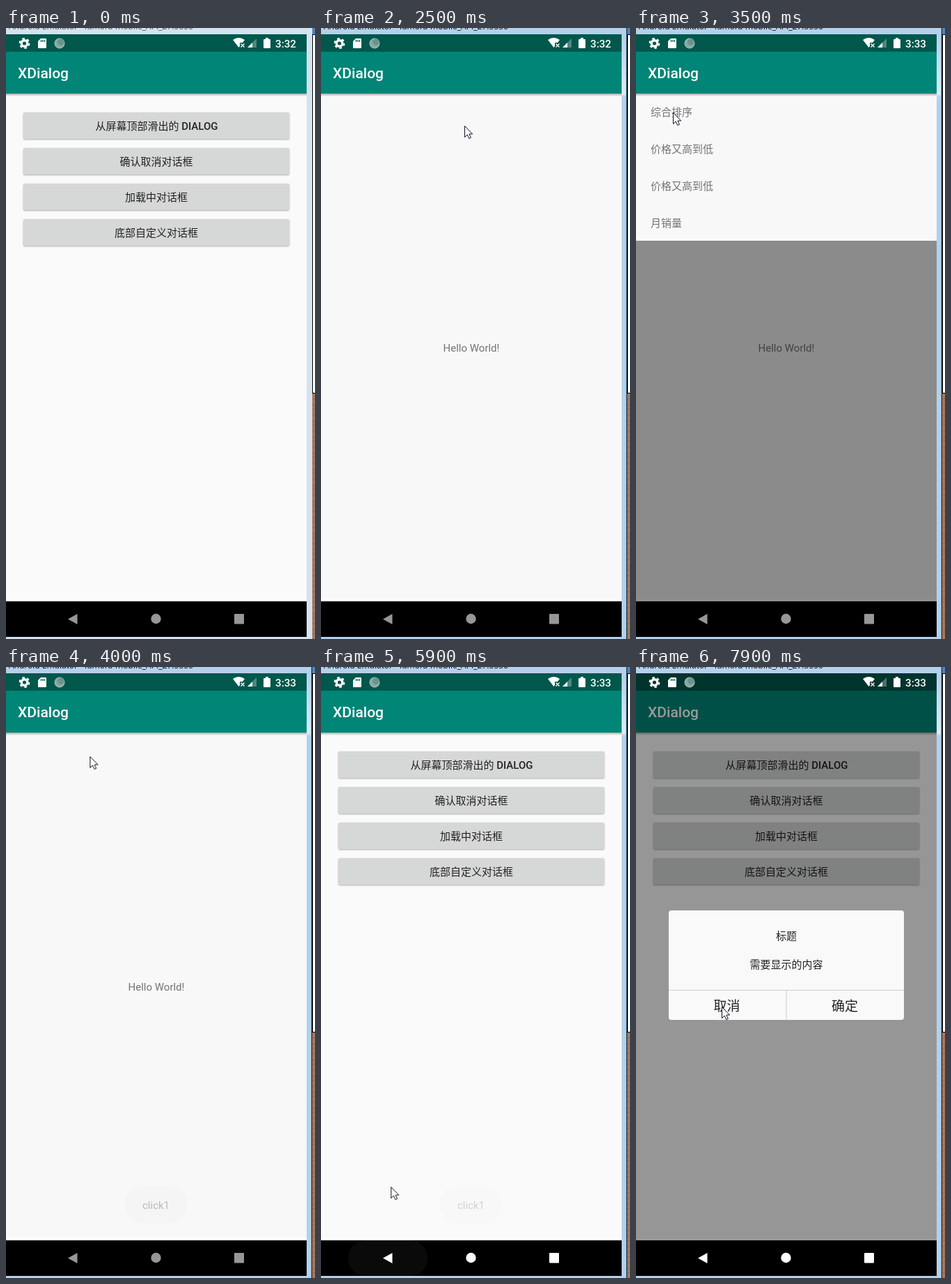
Animation, 444 px wide and 876 px high, one loop 8000 ms. Source, as an HTML page:

```html
<!DOCTYPE html>
<html lang="zh-CN">
<head>
<meta charset="utf-8">
<title>XDialog</title>
<style>
html, body { margin: 0; width: 100%; height: 100%; overflow: hidden; }
body > svg { display: block; width: 444px; height: 876px; }
text { font: 15px Roboto, "Noto Sans CJK SC", sans-serif; fill: #222; }
.mid { text-anchor: middle; }
.medium { font-weight: 500; }
.soft { fill: #747474; }
.big { font-size: 19px; }
.caption { font: 12px "Open Sans", sans-serif; }
.heading { font-size: 21px; font-weight: 500; fill: #fff; }
.clock { font-size: 15.2px; font-weight: 500; fill: #fff; }
.key { fill: #d6d7d7; filter: drop-shadow(0 1px 1px rgba(0, 0, 0, .32)); }

/* One loop is 8 s, so 1% is 80 ms. */
.anim { animation: 8s linear infinite; }
.focus { animation-name: focus; }
.cursor { animation-name: cursor; }
.page { animation-name: page; }
.press1 { animation-name: press1; }
.press2 { animation-name: press2; }
.early { animation-name: early; }
.late { animation-name: late; }
.shade { animation-name: shade; }
.menu { animation-name: menu; }
.toast { animation-name: toast; }
.nav { animation-name: nav; }
.back { animation-name: back; }
.dim { animation-name: dim; }
.dialog { animation-name: dialog; transform-origin: 216px 428px; }

@keyframes focus { 0%, 17.49% { opacity: 0; } 17.5%, 100% { opacity: 1; } }
@keyframes cursor {
  0%, 9.95% { transform: translate(450px, 300px); }
  10% { transform: translate(434px, 285px); animation-timing-function: ease-out; }
  17% { transform: translate(221px, 146px); }
  20%, 31.2% { transform: translate(215px, 140px); }
  31.25%, 38.75% { transform: translate(206px, 140px); animation-timing-function: ease-in-out; }
  43.75%, 45.5% { transform: translate(53px, 121px); animation-timing-function: ease-in-out; }
  53.75%, 57.5% { transform: translate(169px, 133px); animation-timing-function: ease-in-out; }
  63.75% { transform: translate(114px, 812px); animation-timing-function: ease-out; }
  68.75%, 69.5% { transform: translate(98px, 840px); animation-timing-function: ease-in; }
  73.75% { transform: translate(100px, 747px); animation-timing-function: ease-out; }
  80% { transform: translate(160px, 188px); animation-timing-function: ease-out; }
  82.5%, 90% { transform: translate(208px, 187px); animation-timing-function: ease-in-out; }
  98.75%, 100% { transform: translate(123px, 487px); }
}
@keyframes page {
  0%, 20.35% { opacity: 0; transform: translateY(69px); animation-timing-function: cubic-bezier(.22, 1, .36, 1); }
  25.5%, 69.25% { opacity: 1; transform: none; animation-timing-function: ease-in; }
  73%, 100% { opacity: 0; transform: translateY(69px); }
}
@keyframes press1 {
  0%, 17.9% { r: 0; opacity: 0; }
  18% { r: 20px; opacity: 1; }
  22.5% { r: 195px; opacity: 1; }
  25%, 100% { r: 195px; opacity: 0; }
}
@keyframes press2 {
  0%, 84% { r: 0; opacity: 0; }
  84.4% { r: 15px; opacity: 1; }
  87.5% { r: 133px; opacity: 1; }
  88.75%, 90.5% { r: 187px; opacity: 1; }
  92%, 100% { r: 187px; opacity: 0; }
}
@keyframes early { 0%, 33.74% { opacity: 1; } 33.75%, 100% { opacity: 0; } }
@keyframes late { 0%, 33.74% { opacity: 0; } 33.75%, 100% { opacity: 1; } }
@keyframes shade { 0%, 33.1% { opacity: 0; } 36.25%, 45.6% { opacity: .44; } 49.4%, 100% { opacity: 0; } }
@keyframes menu {
  0%, 33.1% { transform: translateY(-212px); }
  36.25%, 45.6% { transform: none; }
  49.4%, 100% { transform: translateY(-212px); }
}
@keyframes toast { 0%, 48.75% { opacity: 0; } 53%, 70.6% { opacity: 1; } 74.5%, 100% { opacity: 0; } }
@keyframes nav { 0%, 69.9% { fill: #979797; } 70%, 100% { fill: #fff; } }
@keyframes back { 0%, 69.5% { opacity: 0; } 70.5%, 74% { opacity: .04; } 79%, 100% { opacity: 0; } }
@keyframes dim { 0%, 84.4% { opacity: 0; } 88.75%, 100% { opacity: .4; } }
@keyframes dialog {
  0%, 84.4% { opacity: 0; transform: scale(.9); animation-timing-function: ease-out; }
  87.3%, 100% { opacity: 1; transform: none; }
}
</style>
</head>
<body>
<svg viewBox="0 0 444 876">
  <defs>
    <linearGradient id="fade" x2="0" y2="1">
      <stop stop-opacity=".32"/><stop offset="1" stop-opacity="0"/>
    </linearGradient>
    <linearGradient id="glass" x2="0" y2="1">
      <stop stop-color="#b5d0ea"/><stop offset=".95" stop-color="#dcebfa"/><stop offset="1" stop-color="#b5d0ea"/>
    </linearGradient>
    <pattern id="wood" width="6" height="23" patternUnits="userSpaceOnUse">
      <path fill="#a87860" d="M0 0h6v23H0z"/>
      <path stroke="#946650" d="M0 4l6-2M0 11l6 1M0 19l6-2"/>
    </pattern>
    <g id="bars">
      <path fill="url(#fade)" d="M0 94h432v4H0z"/>
      <path fill="#00574b" d="M0 9h432v25H0z"/>
      <path fill="#008577" d="M0 34h432v60H0z"/>
      <path d="M0 822h432v51H0z"/>
      <text class="heading" x="17" y="72">XDialog</text>
    </g>
  </defs>

  <!-- desktop and window frame -->
  <path fill="#d5e2f0" d="M0 0h444v876H0z"/>
  <text class="caption" x="4" y="2" style="fill:#555">Android Emulator - lumora-mobile_API_27:5556</text>
  <g class="anim focus">
    <path fill="#b5d0ea" d="M0 0h440v876H0z"/>
    <path fill="url(#glass)" d="M432 9h7v90h-7z"/>
    <text class="caption" x="4" y="2" style="fill:#111">Android Emulator - lumora-mobile_API_27:5556</text>
    <path fill="#6fb4d8" d="M438 0h1v876h-1z"/>
    <path fill="#222" d="M439 0h1v876h-1z"/>
  </g>
  <path fill="#4f84c4" d="M440 0h4v9h-4z"/>
  <path d="M440 9h4v515h-4z"/>
  <path fill="#fff" d="M441 10h3v513h-3z"/>
  <path fill="url(#wood)" d="M440 524h4v352h-4z"/>

  <svg width="432" height="873">
    <!-- button list -->
    <path fill="#fafafa" d="M0 94h432v728H0z"/>
    <path fill="#fff" d="M0 818h432v4H0z"/>
    <use href="#bars"/>
    <g class="key">
      <rect x="25" y="121" width="382" height="38" rx="2"/>
      <rect x="25" y="172" width="382" height="38" rx="2"/>
      <rect x="25" y="223" width="382" height="38" rx="2"/>
      <rect x="25" y="274" width="382" height="38" rx="2"/>
    </g>
    <svg x="25" y="121" width="382" height="38"><circle class="anim press1" cx="192" cy="19" fill-opacity=".06"/></svg>
    <svg x="25" y="172" width="382" height="38"><circle class="anim press2" cx="187" cy="19" fill-opacity=".06"/></svg>
    <g class="mid">
      <text x="216.5" y="146">从屏幕顶部滑出的 <tspan class="medium">DIALOG</tspan></text>
      <text x="216" y="197">确认取消对话框</text>
      <text x="216" y="248">加载中对话框</text>
      <text x="216" y="299">底部自定义对话框</text>
    </g>

    <!-- second page -->
    <g class="anim page">
      <path fill="#f8f8f8" d="M0 94h432v728H0z"/>
      <path fill="#fff" d="M0 818h432v4H0z"/>
      <text class="mid soft" x="216" y="464">Hello World!</text>
      <path class="anim shade" d="M0 94h432v728H0z"/>
      <svg y="94" width="432" height="728">
        <g class="anim menu">
          <path fill="#f8f8f8" d="M0 0h432v211H0z"/>
          <text class="soft" x="21" y="32">综合排序</text>
          <text class="soft" x="21" y="85">价格又高到低</text>
          <text class="soft" x="21" y="138">价格又高到低</text>
          <text class="soft" x="21" y="191">月销量</text>
        </g>
      </svg>
      <use href="#bars"/>
    </g>

    <path class="anim dim" d="M0 9h432v813H0z"/>

    <!-- status icons -->
    <g fill="none" stroke="#fff">
      <circle cx="26.5" cy="22" r="4.3" stroke-width="3.4"/>
      <circle cx="26.5" cy="22" r="6.8" stroke-width="2.2" stroke-dasharray="3.6 3.52"/>
    </g>
    <path fill="#fff" d="M50 15h7q1 0 1 1v12q0 1-1 1H47q-1 0-1-1v-9z"/>
    <path stroke="#00574b" stroke-width="1.3" d="M50.5 17v3M53 17v3M55.5 17v3"/>
    <circle cx="77" cy="22" r="7" fill="#86aaa4" stroke="#b3c9c5"/>
    <circle cx="79" cy="20" r="4.8" fill="#6c938c"/>
    <path fill="#fff" d="M326 17q8.500-6 17 0l-3 4h-4v5l-1.500 2z"/>
    <path stroke="#fff" stroke-width="1.400" d="M337.500 22.500l5 5M342.500 22.500l-5 5"/>
    <path fill="#fff" fill-opacity=".3" d="M347 28l13-13v13z"/>
    <path fill="#fff" d="M347 28l7-7v7zM373 14h4v2h2q1 0 1 1v11q0 1-1 1h-8q-1 0-1-1V17q0-1 1-1h2z"/>
    <text class="clock anim early" x="387" y="28">3:32</text>
    <text class="clock anim late" x="387" y="28">3:33</text>

    <!-- navigation bar -->
    <rect class="anim back" x="39" y="822" width="114" height="51" rx="25" fill="#fff"/>
    <g class="anim nav">
      <path d="M89 847.500l13.500-7.500v15z"/>
      <circle cx="215.500" cy="847" r="7.200"/>
      <rect x="328" y="840" width="14" height="14.500" rx="1"/>
    </g>

    <g class="anim toast">
      <rect x="171" y="745" width="89" height="52" rx="25" fill="#efefef"/>
      <text class="mid" x="215.500" y="777">click1</text>
    </g>

    <!-- confirm dialog -->
    <g class="anim dialog mid">
      <rect x="47" y="349" width="338" height="157" rx="4" fill="#f9f9f9"/>
      <path fill="#ccc" d="M47 463h338v1H47zM215.500 464h1v42h-1z"/>
      <text x="216" y="391">标题</text>
      <text x="216" y="432">需要显示的内容</text>
      <text class="big" x="130.500" y="492.500">取消</text>
      <text class="big" x="300" y="492.500">确定</text>
    </g>
  </svg>

  <g class="anim cursor">
    <path fill="#fff" stroke="#112" d="M.5.5v16l3.700-3.500 2.600 5.500 2.600-1.200-2.500-5.300h4.800z"/>
  </g>
</svg>
</body>
</html>
```
